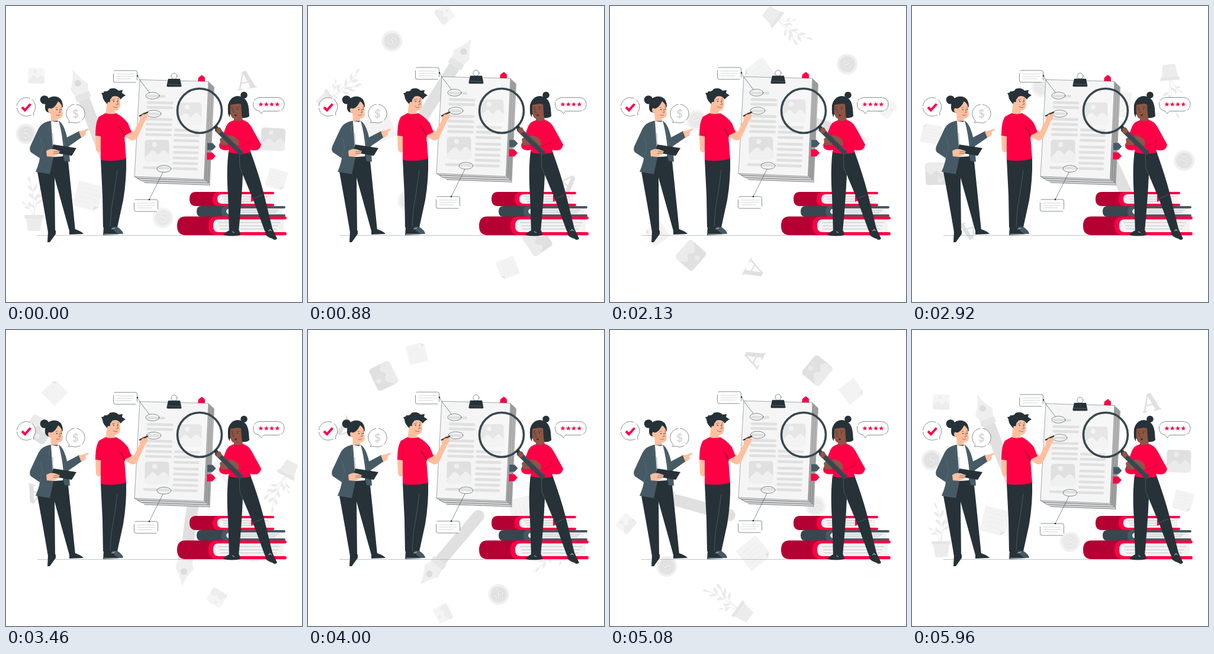
Animation of 500 by 500 pixels, one loop 6000 ms. Source, as an HTML page:

```html
<!DOCTYPE html>
<html lang="en">
<head>
<meta charset="utf-8">
<title>Reviewing a document</title>
<style>
html, body { margin: 0; width: 100%; height: 100%; overflow: hidden; background: #fff; }
svg { display: block; width: 100vw; height: 100vh; }
.red { fill: #ff0045; }
.wine { fill: #b50034; }
.ink { fill: #263238; }
.slate { fill: #455a64; }
.skin { fill: #ffbf9f; }
.brown { fill: #8f5545; }
.line { fill: none; stroke: #263238; stroke-width: .55; stroke-linecap: round; stroke-linejoin: round; }
.thin { fill: none; stroke: #60727a; stroke-width: .6; }
.card { fill: #fff; stroke: #263238; stroke-width: .55; }
</style>
</head>
<body>
<svg viewBox="0 0 500 500" preserveAspectRatio="xMidYMid meet">
  <defs>
    <g id="picture">
      <rect x="-20.5" y="-19" width="41" height="38" rx="5"/>
      <g class="hill">
        <circle cx="-4" cy="-11" r="4.2"/>
        <path d="M-20.5 11 L-10 0 Q-7 -2 -4 0 L2 6 L9 -1 Q12 -3 15 0 L20.5 6 V14 Q20 19 15 19 H-15 Q-20 19 -20.5 14Z"/>
      </g>
    </g>
    <g id="coin">
      <circle r="17.5" fill="#f0f0f0"/>
      <circle r="13.5" fill="#e3e3e3"/>
      <text y="8" text-anchor="middle" font-family="Lato, sans-serif" font-weight="700" font-size="22" fill="#f0f0f0" stroke="#d6d6d6" stroke-width=".8">$</text>
    </g>
    <g id="paper">
      <path d="M-20 -20 H20 V13 L13 20 H-20Z" fill="#f3f3f3"/>
      <path d="M20 13 H13 V20Z" fill="#e4e4e4"/>
      <path d="M-13 -11 H13 M-13 -4 H13 M-13 3 H13 M-13 10 H6" stroke="#ededed" stroke-width=".9"/>
    </g>
    <path id="star" class="red" d="M0 -4 L1.1 -1.3 L4 -1.1 L1.8 .7 L2.5 3.5 L0 2 L-2.5 3.5 L-1.8 .7 L-4 -1.1 L-1.1 -1.3Z"/>
  </defs>

  <rect width="500" height="500" fill="#fff"/>

  <g id="orbit">
    <g transform="translate(51.500 118) rotate(3) scale(.68)" fill="#f5f5f5"><use href="#picture" style="--hill:#ededed"/></g>
    <g transform="translate(451 225) rotate(3)" fill="#e0e0e0"><use href="#picture" style="--hill:#ebebeb"/></g>
    <use href="#coin" transform="translate(34 216)"/>
    <use href="#coin" transform="translate(265 358)" opacity=".75"/>
    <use href="#paper" transform="translate(139 321) rotate(15) scale(1.08)"/>
    <use href="#paper" transform="translate(457 292.500) rotate(16) scale(.8)"/>
    <text transform="translate(407.500 140) rotate(-10)" text-anchor="middle" font-family="'Liberation Serif', 'Noto Serif', serif" font-weight="700" font-size="46" fill="#e0e0e0">A</text>
    <!-- pen, tip at the local zero, shaft along +x -->
    <g transform="translate(112.500 107) rotate(69.300)">
      <path d="M0 0 Q20 -6 31 -15.500 L46 -11 V11 L31 15.500 Q20 6 0 0Z" fill="#efefef"/>
      <circle cx="25" r="5.500" fill="#dcdcdc"/>
      <path d="M44 -13 H54 V13 H44Z" fill="#e6e6e6"/>
      <path d="M54 -10 H153 A10 10 0 0 1 153 10 H54Z" fill="#e0e0e0"/>
    </g>
    <g id="plant" fill="#ebebeb">
      <path d="M47 354 Q49 325 41 296 M48 354 Q50 328 57 312 M45 354 Q43 342 33 334" fill="none" stroke="#ebebeb" stroke-width="1"/>
      <path d="M31 353 H64 L63 359 H32Z" fill="#e6e6e6"/>
      <path d="M34 359 H61 L58 380 H37Z" fill="#ececec"/>
    </g>
  </g>

  <path d="M53 387.500 H474" stroke="#a5adb1" stroke-width=".7"/>

  <g id="board">
    <path d="M324 128 L325 121 L331 116.500 L336 121 V128Z" class="red"/>
    <path d="M342 127.500 L352 137 L344.500 302.500 L334.500 293Z" fill="#a3a3a3"/>
    <path d="M217 288 L334.500 293 L344.500 302.500 L234 298.500Z" fill="#d8d8d8"/>
    <path class="line" d="M217 288 L222 291 L337 295.500 M222 291 L228 295 L341 299 M234 298.500 L344.500 302.500"/>
    <path d="M345 131 L338 296 M348.500 134 L341.500 299" stroke="#777" stroke-width=".6"/>
    <path d="M226 124.500 L342 127.500 L334.500 293 L217 288Z" fill="#f5f5f5" stroke="#455a64" stroke-width=".5"/>
    <path d="M340 231.500 H349 L354.500 237.500 L349 243.500 H340Z" class="slate"/>
    <path d="M339.500 247.500 H348.500 L354 253.500 L348.500 259.500 H339.500Z" class="red"/>
    <g id="rows" fill="none" stroke="#e0e0e0" stroke-width="4.600" stroke-linecap="round"></g>
    <g fill="#e0e0e0">
      <use href="#picture" transform="translate(255 245)" style="--hill:#f0f0f0"/>
      <use href="#picture" transform="translate(310 182)" style="--hill:#f0f0f0"/>
    </g>
    <g class="line">
      <ellipse cx="247.500" cy="151.500" rx="11.500" ry="5.800"/>
      <ellipse cx="249.500" cy="182" rx="12.500" ry="6"/>
      <ellipse cx="267" cy="275" rx="12" ry="5.800"/>
      <path d="M222 118 L226 125 L242 146 M242 327 L265 281"/>
    </g>
    <path class="ink" d="M274 123 H294 L296.500 135 Q296 137 294 136.500 H273 Q271 136 271.500 134Z"/>
    <path d="M272.500 132 L296 133" stroke="#68777e" stroke-width=".6"/>
    <circle class="line" cx="284" cy="118.500" r="5" stroke-width=".8"/>
    <g id="notes"></g>
    <circle class="ink" cx="222" cy="118" r="1.300"/>
    <circle class="ink" cx="242" cy="327" r="1.300"/>
  </g>

  <g id="books"></g>
  <path d="M414 320 H426 V331 L420 328 L414 331Z" class="red"/>

  <g id="bubbles">
    <path class="card" d="M41 184.500 A15.700 15.700 0 1 1 46.500 180 L47 184Z" stroke-dasharray="30 3"/>
    <path d="M27 171 L32 176 L41.500 165.500" fill="none" stroke="#ff0045" stroke-width="4"/>
    <path class="card" d="M107 193.500 A15.700 15.700 0 1 1 112 196.500 L105.500 197Z" stroke-dasharray="36 3"/>
    <text x="117.500" y="189" text-anchor="middle" font-family="Lato, sans-serif" font-weight="900" font-size="18" fill="#dadada">$</text>
    <path class="card" d="M429 154.500 H458 Q470 155 470 166 T458 177.500 H435 L431 182 L428 177.500 Q417.500 176 417.500 166 T429 154.500Z" stroke-dasharray="60 2"/>
    <use href="#star" x="430.500" y="166"/><use href="#star" x="439.800" y="166"/>
    <use href="#star" x="449" y="166"/><use href="#star" x="458.300" y="166"/>
  </g>

  <g id="analyst">
    <circle class="ink" cx="65" cy="158.500" r="7.300"/>
    <path class="ink" d="M66 172 C65 155 78 150 88 154 Q96 158 96 170 L86 185 L73 180 Q66 179 66 172Z"/>
    <path class="skin" d="M75 174 Q83 172 88 161 Q94 165 95 172 L96 183 Q95 190 88 190 L87 199 L76 196Z"/>
    <path class="skin" d="M77 174 Q71 170 71 176 Q72 182 77 180Z"/>
    <path class="line" d="M84 172 L87 171 M92 171 L94 171 M90 174 L92 180 L89 180 M85 184 Q88 186 91 184"/>
    <circle class="ink" cx="86" cy="175" r=".9"/><circle class="ink" cx="93" cy="174.500" r=".9"/>
    <path class="ink" d="M53 280 L78 252 H104 Q109 300 117 379 L107 380 Q96 340 82 290 L83 381 L71 382 Q64 340 53 280Z"/>
    <path class="ink" d="M71 381 L84 379 L84 385 L74 399 L70 399Z"/>
    <path class="ink" d="M107 379 L117 377 Q128 381 131 385 L107 386Z"/>
    <path class="slate" d="M74 194 L89 194 Q98 199 103 222 L124 211 L129 221 L106 237 L108 263 L99 262 L96 250 L81 252 L74 284 L50 280 Q56 266 57 257 L42 247 Q39 243 41 237 L55 207 Q60 197 74 194Z"/>
    <path d="M76 194 L86 196 L89 194 Q95 215 97 240 L96 254 L80 255Z" fill="#fff"/>
    <path d="M76 194 L72 210 L79 216 L80 254 M89 194 Q97 205 98 225 L99 240 M58 222 L62 240 L57 257 M103 222 L100 212" class="thin" stroke="#263238"/>
    <path class="ink" d="M80 234 L119 240 L111 253 L76 247Z"/>
    <path class="skin" d="M68 245 Q74 240 82 242 L91 245 L89 250 L80 255 L69 254Z"/>
    <path class="line" d="M81 246 H90 M80 249 H89"/>
    <path class="skin" d="M123 212 L131 210 L139 207 L140 209 L134 213 Q137 217 131 221 L127 222Z"/>
  </g>

  <g id="writer">
    <path class="skin" d="M151 219 H160 L160 245 Q157 251 152 243Z"/>
    <path class="ink" d="M160 259 L203 257 Q204 292 198 328 L188 374 L164 374 L163 320Z"/>
    <path class="thin" d="M188 277 Q184 310 178 343 L176 373"/>
    <path class="slate" d="M165 374 L188 373 Q198 380 198 385 L165 386Z"/>
    <path class="ink" d="M165 373 L178 373 Q182 381 192 386 L164 387Z"/>
    <path d="M165 385.500 H197 M178 377 L184 375" stroke="#fff" stroke-width=".7"/>
    <path class="skin" d="M172 155 L192 151 L193 167 Q192 177 184 177 L183 187 L168 184Z"/>
    <path class="ink" d="M175 169 Q163 160 163 151 L161 147 Q166 147 166 144 Q173 145 175 140 Q185 137 190 143 L197 142 L196 147 L202 151 Q196 154 194 158 Q189 150 180 153 L176 158Z"/>
    <path class="skin" d="M177 163 Q171 160 171 166 Q173 171 177 168Z"/>
    <path class="line" d="M179 159 L184 157 M188 157 L191 157 M187 161 L190 166 L186 167 M181 170 Q185 173 188 171"/>
    <circle class="ink" cx="182" cy="161" r=".9"/><circle class="ink" cx="189" cy="160.500" r=".9"/>
    <path class="skin" d="M198 218 L210 209 L216 212 L226 193 Q225 184 233 179 L239 181 Q240 189 235 194 L222 222 Q217 230 208 225Z"/>
    <path class="red" d="M168 181 Q177 184 186 181 Q198 187 206 198 L212 213 L200 219 L203 258 Q180 264 160 260 L160 220 L151 219 Q151 196 157 187Z"/>
    <path class="wine" d="M201 220 Q198 208 189 203 Q196 211 200 222Z"/>
    <path d="M160 220 L161 207" fill="none" stroke="#b50034" stroke-width=".7"/>
    <path d="M225 186 L240 179" stroke="#263238" stroke-width="2.200"/>
    <path class="skin" d="M229 184 Q236 181 237 185 Q234 189 230 190Z"/>
  </g>

  <g id="inspector">
    <circle class="ink" cx="402" cy="150.500" r="5.800"/>
    <path class="ink" d="M375 182 Q374 153 391 152 Q408 153 410 173 L411 186 Q406 190 397 189Z"/>
    <path class="brown" d="M378 167 L398 164 L398 182 L400 194 L385 196 L385 190 Q378 190 378 167Z"/>
    <path class="ink" d="M375 168 Q378 153 392 154 Q401 157 402 181 L398 180 L397 166 Q386 163 379 167 L378 188 Q374 184 375 168Z"/>
    <path class="line" d="M380 171 H384 M389 171 H394 M385 174 L383 179 L386 180" stroke="#3a2019"/>
    <circle class="ink" cx="382" cy="174" r=".9"/><circle class="ink" cx="391" cy="174" r=".9"/>
    <ellipse cx="388" cy="184.500" rx="2" ry="1.500" fill="#5b241d"/>
    <path class="ink" d="M376 245 L412 243 Q427 284 435 315 L450 376 L437 380 L418 328 L400 285 Q398 330 393 381 L377 382 Q376 350 375 320 Q372 276 376 245Z"/>
    <path class="thin" d="M394 249 L395 273 L400 285 M419 325 L433 319"/>
    <path class="ink" d="M377 379 L394 379 L396 387 Q382 390 367 387 Q369 383 377 379Z"/>
    <path class="ink" d="M437 378 L449 374 L458 393 Q454 397 450 393 Q443 391 439 387Z"/>
    <path d="M382 381 L386 383 M443 380 L447 378 M445 377 L449 380" stroke="#fff" stroke-width=".7"/>
    <path class="red" d="M385 193 Q394 196 399 192 Q410 195 415 205 L431 234 Q430 244 419 244 L413 243 L412 248 Q393 252 376 247 L377 243 Q360 246 360 235 L372 203 Q376 195 385 193Z"/>
    <path d="M411 224 L413 229 L397 236 M378 226 L377 244" fill="none" stroke="#b50034" stroke-width=".7"/>
  </g>

  <g id="lens">
    <path class="brown" d="M361 225 Q366 219 372 223 L377 228 L374 235 L363 235Z"/>
    <path class="brown" d="M375 219 Q385 217 393 227 L394 235 L381 237 L372 230 L379 228Z"/>
    <circle cx="327" cy="177" r="37.500" fill="#fff" fill-opacity=".18" stroke="#37474f" stroke-width="3.600"/>
    <path d="M353 203 L359 210" stroke="#263238" stroke-width="6"/>
    <path d="M357 209 L396 247" stroke="#37474f" stroke-width="8.500" stroke-linecap="round"/>
    <path d="M360 207 L398 244" stroke="#6a7d86" stroke-width=".6"/>
    <path class="brown" d="M356 207 Q361 203 363 207 L365 211 L360 216 L355 213Z"/>
  </g>
</svg>
<script>
const LOOP = 6000, TURN = 5975, BOB = 1500, FPS = 24;
const NS = 'http://www.w3.org/2000/svg';
const $ = id => document.getElementById(id);

function add(parent, tag, attrs) {
  const el = document.createElementNS(NS, tag);
  for (const key in attrs) el.setAttribute(key, attrs[key]);
  parent.append(el);
  return el;
}

document.querySelector('#picture .hill').style.fill = 'var(--hill)';

// text rows on the page: x start, x end, y values; the page leans left going down
const rows = [
  [240, 267, [152]],
  [240.5, 281, [163, 171, 191, 199.5, 208.5, 217]],
  [240.5, 259, [182]],
  [289, 328, [209.5, 218, 227, 238, 247, 256.5, 265.5, 274.5]],
  [240, 281, [273]]
];
for (const [from, to, ys] of rows)
  for (const y of ys) {
    const lean = (y - 152) * .05;
    add($('rows'), 'path', { d: `M${from - lean} ${y} L${to - lean} ${y + (to - from) * .025}` });
  }

for (const [x, y] of [[181.5, 109], [216.5, 327]]) {
  add($('notes'), 'rect', { x, y, width: 40, height: 20, rx: 3, class: 'card', 'stroke-dasharray': '52 4' });
  add($('notes'), 'path', {
    d: `M${x + 5} ${y + 6} h30 m-30 4 h30 m-30 4 h25`,
    stroke: '#c9c9c9', 'stroke-width': .8, fill: 'none'
  });
}

// one book: left, right, top, bottom, end of the spine, cover thickness, colours
function book(l, r, t, b, spine, edge, dark, light) {
  const g = $('books'), mid = (t + b) / 2, bend = (b - t) * .45;
  const left = x => `${x + bend} ${t} Q${x} ${t} ${x} ${mid} T${x + bend} ${b}`;
  add(g, 'path', { d: `M${left(l)} H${spine + 25} V${t}Z`, fill: dark });
  add(g, 'path', { d: `M${left(spine)} H${r - 2} Q${r} ${b} ${r} ${b - edge / 2} T${r - 2} ${b - edge} V${t + edge} Q${r} ${t + edge} ${r} ${t + edge / 2} T${r - 2} ${t}Z`, fill: light });
  const p = spine + 8, top = t + edge, low = b - edge;
  add(g, 'path', { d: `M${p + 8} ${top} Q${p} ${top} ${p} ${mid} T${p + 8} ${low} H${r - 5} V${top}Z`, fill: '#f3f3f3' });
  add(g, 'path', { d: `M${r - 5} ${top} H${r} V${low} H${r - 5}Z`, fill: '#fff' });
  for (const f of [.25, .5, .75]) {
    const y = top + (low - top) * f;
    add(g, 'path', { d: `M${p + 6 + f * 8} ${y} H${r - 8 - f * 12}`, stroke: '#9aa3a8', 'stroke-width': .6 });
  }
}
book(310, 453, 314, 338, 349, 4, '#b50034', '#ff0045');
book(322, 472, 338, 356, 364, 4, '#37474f', '#455a64');
book(289, 474, 355.5, 387, 342, 5, '#b50034', '#ff0045');

// leaves: x, y, angle, length
const leaves = [
  [41, 298, -20, 11], [45, 312, -45, 13], [46, 314, 25, 15], [48, 326, -45, 14],
  [48, 329, 32, 15], [57, 314, 15, 14], [53, 324, 55, 13], [51, 334, 60, 13],
  [48, 341, -50, 13], [33, 335, -50, 8], [39, 339, 5, 10], [41, 342, -75, 11]
];
for (const [x, y, a, n] of leaves)
  add($('plant'), 'path', {
    d: `M0 0 Q${-n * .35} ${-n * .5} 0 ${-n} Q${n * .35} ${-n * .5} 0 0`,
    transform: `translate(${x} ${y}) rotate(${a})`
  });

function draw(now) {
  const step = Math.floor((now % LOOP + 5) * FPS / 1000);
  const t = step * 1000 / FPS;
  const lift = -5.5 * (1 - Math.cos(2 * Math.PI * t / BOB)) / 2;
  $('orbit').setAttribute('transform', `rotate(${360 * t / TURN} 246 246.5)`);
  $('board').setAttribute('transform', `translate(0 ${lift})`);
}

const start = performance.now();
function tick() {
  draw(performance.now() - start);
  requestAnimationFrame(tick);
}
tick();
</script>
</body>
</html>
```
